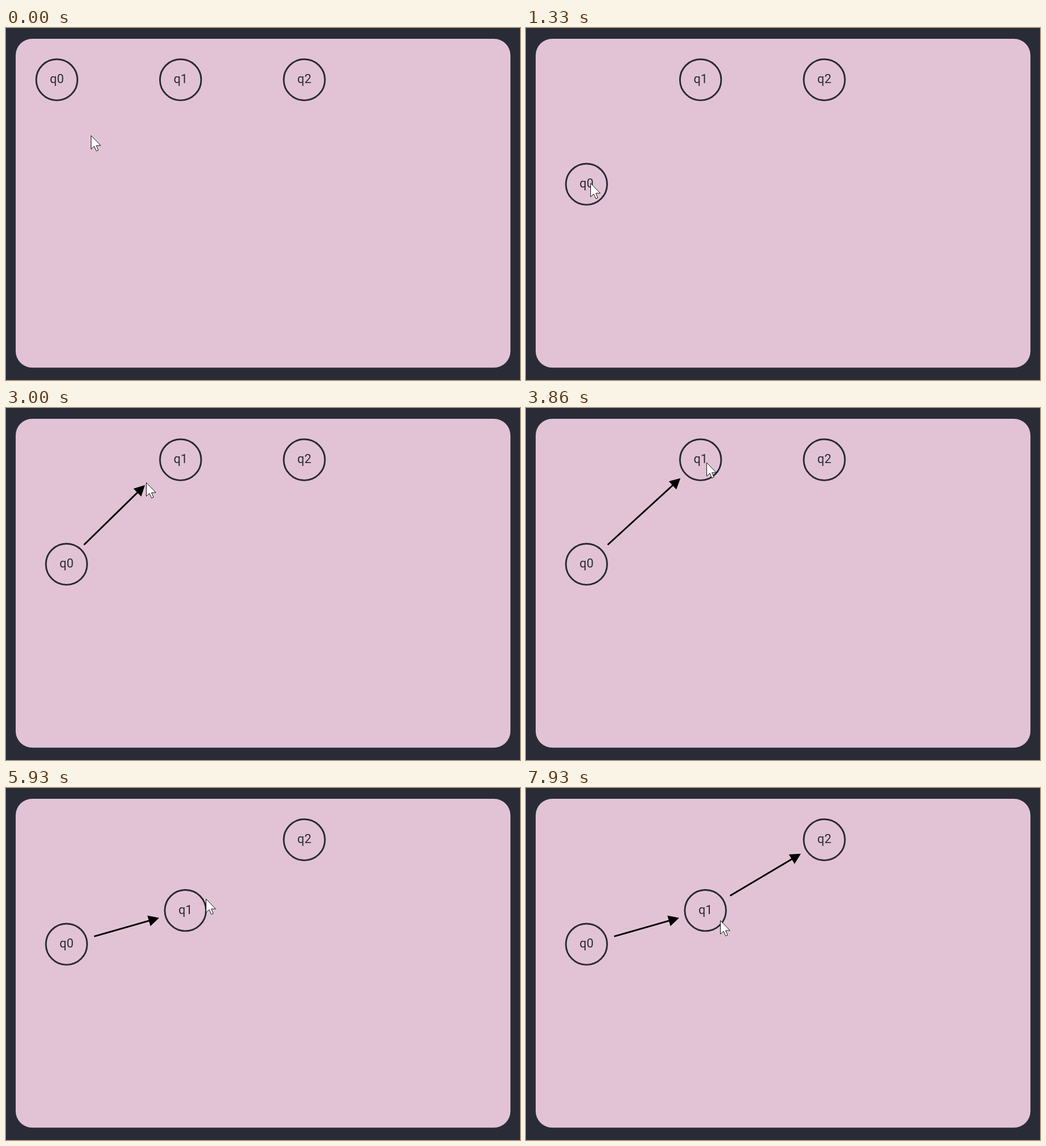
Write an HTML page that moves like this. It is 903x620 px and loops after 8 s.

```html
<!DOCTYPE html>
<html lang="en">
<head>
<meta charset="utf-8">
<title>State diagram editor</title>
<style>
  html, body { margin: 0; width: 100%; height: 100%; overflow: hidden; background: #292c36; }
  svg { display: block; }
  .node circle { fill: none; stroke: #282a36; stroke-width: 2.9; }
  .node text { font: 21.7px Roboto, "Liberation Sans", sans-serif; fill: #282a36; text-anchor: middle; }
  .link line { stroke: #000; stroke-width: 2.9; }
</style>
</head>
<body>
<svg width="903" height="620" viewBox="0 0 903 620">
  <rect x="17" y="19" width="869.2" height="579.2" rx="29" fill="#e2c3d5"/>
  <g class="node"><circle r="36.2"/><text y="6.2">q0</text></g>
  <g class="node"><circle r="36.2"/><text y="6.2">q1</text></g>
  <g class="node"><circle r="36.2"/><text y="6.2">q2</text></g>
  <g class="link"><line/><path d="M0 0L-18.7 -9.7V9.7Z"/></g>
  <g class="link"><line/><path d="M0 0L-18.7 -9.7V9.7Z"/></g>
  <path id="cursor" d="M.5 .5V24.4L6 19.3L9.7 27.6L13.2 26.1L9.6 18H17.3Z" fill="#fff" stroke="#111" stroke-width="1"/>
</svg>
<script>
const LOOP = 8000, FPS = 15, FRAME = 1000 / FPS;

// where the hand goes; it rests for `hold` ms or passes straight through
const at = (t, x, y, hold = 0) => hold ? [[t, x, y], [t + hold, x, y]] : [[t, x, y]];
const path = [
  at(0, 149, 189, 60),
  at(720, 96, 89, 80),        // grab q0
  at(1270, 113, 273, 70),     // drop q0
  at(1850, 137, 241, 150),    // start first arrow
  at(2800, 240, 151),
  at(3000, 246, 131),
  at(3600, 271, 115, 60),     // land on q1
  at(3860, 316, 96),
  at(4000, 330, 93.5, 260),   // grab q1
  at(4850, 338.5, 218, 80),   // drop q1
  at(5500, 361, 190),
  at(5940, 351, 195, 60),     // start second arrow
  at(6600, 476.5, 126.5, 200),
  at(7100, 486, 114, 100),    // land on q2
  at(7660, 394, 193),
  at(7930, 341, 233, 70)
].flat();

const clamp = (v, a, b) => Math.min(b, Math.max(a, v));
const rate = (i, c) => (path[i + 1][c] - path[i][c]) / (path[i + 1][0] - path[i][0]);

// monotone tangent, so that pauses stay still
function slope(i, c) {
  if (i === 0 || i === path.length - 1) return 0;
  const a = rate(i - 1, c), b = rate(i, c);
  return a * b > 0 ? 2 * a * b / (a + b) : 0;
}

function pointer(t) {
  let i = 0;
  while (i < path.length - 2 && path[i + 1][0] <= t) i++;
  const h = path[i + 1][0] - path[i][0];
  const u = clamp((t - path[i][0]) / h, 0, 1), v = 1 - u;
  return [1, 2].map(c =>
    v * v * (1 + 2 * u) * path[i][c] + u * u * (3 - 2 * u) * path[i + 1][c] +
    h * u * v * (v * slope(i, c) - u * slope(i + 1, c)));
}

const drags = [{ grab: 800, drop: 1270 }, { grab: 4260, drop: 4850 }];
const links = [{ press: 2000, drop: 3550 }, { press: 6000, drop: 7100 }];

function place(i, t) {
  const home = [89.3 + 217.4 * i, 91.2];
  if (!drags[i]) return home;
  const { grab, drop } = drags[i];
  const p = pointer(grab), q = pointer(clamp(t, grab, drop));
  return home.map((v, c) => v + q[c] - p[c]);
}

// a loose arrow trails the pointer by one frame; a dropped one spans its two nodes
function ends(i, t, spots) {
  const { press, drop } = links[i];
  if (t < drop) return [pointer(press), pointer(Math.max(press, t - FRAME))];
  const p = spots[i], q = spots[i + 1];
  const d = Math.hypot(q[0] - p[0], q[1] - p[1]);
  const along = s => p.map((v, c) => v + (q[c] - v) * s / d);
  return [along(50.5), along(d - 48)];
}

const nodeEls = document.querySelectorAll('.node');
const linkEls = document.querySelectorAll('.link');
const cursor = document.getElementById('cursor');
const move = (el, p, turn = 0) => el.setAttribute('transform', `translate(${p}) rotate(${turn})`);

function drawLink(el, i, t, spots) {
  const shown = t >= links[i].press;
  el.style.display = shown ? '' : 'none';
  if (!shown) return;
  const [a, b] = ends(i, t, spots);
  const dx = b[0] - a[0], dy = b[1] - a[1];
  const angle = Math.atan2(dy, dx), back = Math.min(15, Math.hypot(dx, dy));
  const line = {
    x1: a[0], y1: a[1],
    x2: b[0] - back * Math.cos(angle), y2: b[1] - back * Math.sin(angle)
  };
  for (const k in line) el.firstChild.setAttribute(k, line[k]);
  move(el.lastChild, b, angle * 180 / Math.PI);
}

function draw(now) {
  const step = Math.floor((now % LOOP + 6.7) / FRAME);
  const t = Math.min(step * FRAME, LOOP - FRAME);
  const spots = [0, 1, 2].map(i => place(i, t));
  spots.forEach((p, i) => move(nodeEls[i], p));
  linkEls.forEach((el, i) => drawLink(el, i, t, spots));
  move(cursor, pointer(t));
}

let start;
function tick(now) {
  start ??= now;
  draw(now - start);
  requestAnimationFrame(tick);
}
draw(0);
requestAnimationFrame(tick);
</script>
</body>
</html>
```
